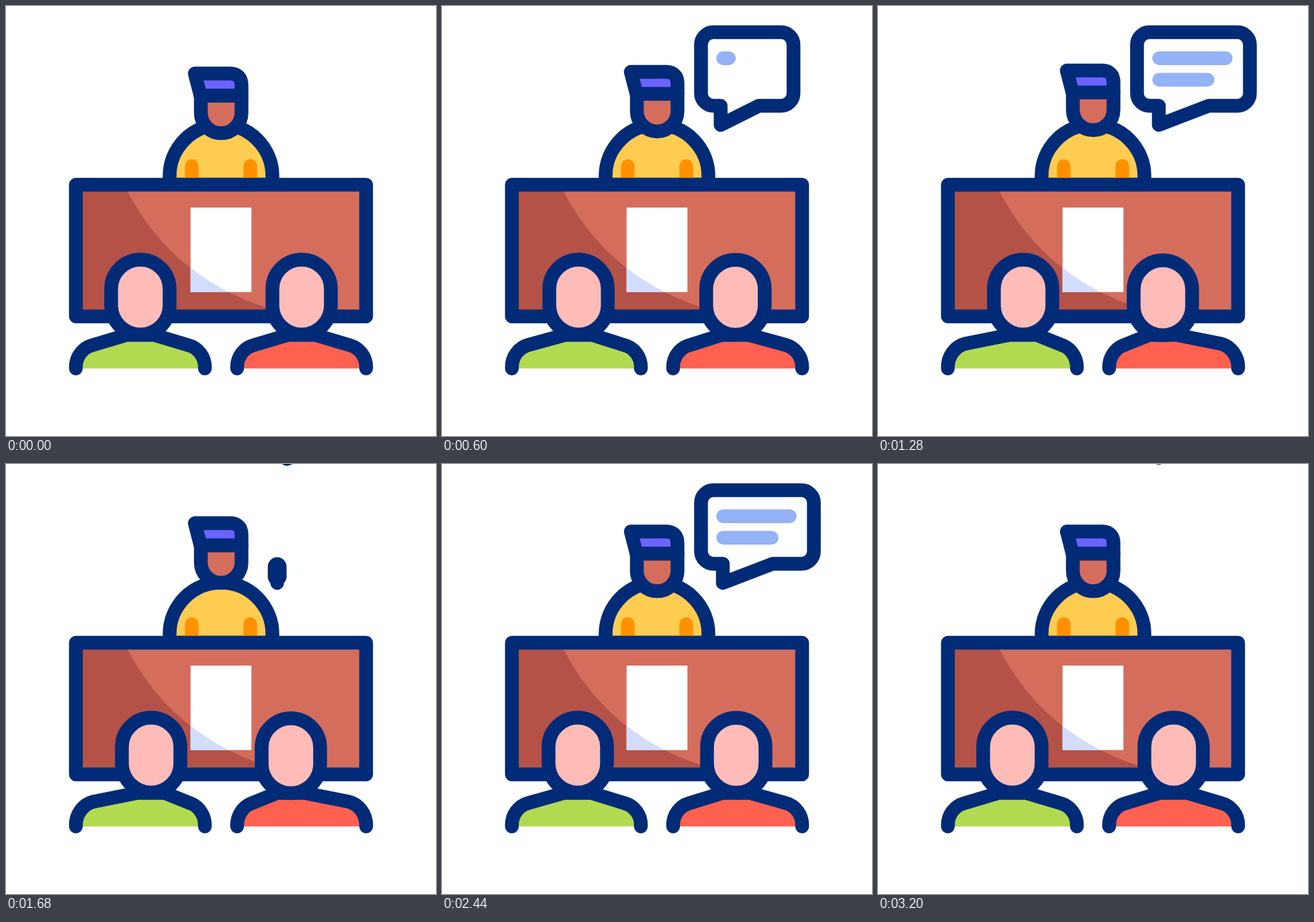
Write an HTML page with a canvas that moves like this. It is 640 by 640 pixels and loops after 3.4 s.

```html
<!DOCTYPE html>
<html lang="en">
<head>
<meta charset="utf-8">
<title>Panel talk</title>
<style>
  html, body { margin: 0; width: 100%; height: 100%; overflow: hidden; background: #fff; }
  canvas { display: block; width: 640px; height: 640px; }
</style>
</head>
<body>
<canvas id="stage"></canvas>
<script>
const LOOP = 3400, STEP = 20, LAST = 3200, CYCLE = 1512;
const NAVY = '#022b77', WOOD = '#d56d5d', SHADE = '#b45248', SKIN = '#fdbcb8';
const LINE = 20.5;

const canvas = document.getElementById('stage');
const ctx = canvas.getContext('2d');
const ratio = window.devicePixelRatio || 1;
canvas.width = canvas.height = 640 * ratio;

const lerp = (a, b, k) => a + (b - a) * k;

// Eased progress from 0 to 1
function ease(t, start, length) {
  const p = Math.min(1, Math.max(0, (t - start) / length));
  return p * p * (3 - 2 * p);
}

function shape(path, fill, stroke = NAVY) {
  const p = typeof path === 'string' ? new Path2D(path) : path;
  if (fill) { ctx.fillStyle = fill; ctx.fill(p); }
  if (stroke) { ctx.strokeStyle = stroke; ctx.stroke(p); }
}

function speaker(t) {
  shape('M243.5 266V253A76.5 76.5 0 0 1 396.5 253V266Z', '#ffcc52');
  for (const x of [266.3, 353.3]) {
    shape(`M${x} 260V238.3a10.2 10.2 0 0 1 20.4 0V260Z`, '#ff9100', null);
  }
  const lift = ease(t, 0, 270) - ease(t, 270, 463)
             + ease(t, 1064, 546) - ease(t, 1610, 546);
  ctx.save();
  ctx.translate(0, -13 * lift);
  shape('M290 133.3V159a30.2 30.2 0 0 0 60.5 0V133.3Z', WOOD);
  shape('M281 100.5H333.5Q350.5 101 350.5 118V133.3H289.5Z', '#6c63ff');
  ctx.restore();
}

function desk() {
  const edge = 'M181 276C205 322 238 362 275 390C310 417 350 438 395 451';
  const shadow = new Path2D(edge + 'V462H104V266H176Z');
  const paper = new Path2D('M274.7 300H365.3V425.7H274.7Z');
  shape('M104 266H536V462H104Z', WOOD, null);
  shape(shadow, SHADE, null);
  shape(paper, '#fff', null);
  ctx.save();
  ctx.clip(paper);
  shape(shadow, '#d2dcfd', null);
  ctx.restore();
  shape('M104 266H536V462H104Z', null);
}

function listener(k, shirt, sink) {
  const x = 200 + 16 * k;
  const lx = lerp(128, 130.5, k), ly = lerp(505, 502.5, k);
  const rx = lerp(272, 277, k), ry = lerp(505, 506, k);
  shape(`M104 539.5V537C104 522 114 ${ly + 4} ${lx} ${ly}L${x - 20} 489.5H${x + 20}` +
        `L${rx} ${ry}C286 ${ry + 4} 296 522 296 537V539.5`, shirt);
  const head = new Path2D();
  head.roundRect(x - 43.5, 377.5 + sink * k, 87, 111.5, 43.5);
  shape(head, SKIN);
}

function audience(t) {
  const k = ease(t, 385, 745) - ease(t, 1864, 743);
  listener(k, '#b1da51', 0);
  ctx.save();
  ctx.translate(640, 0);
  ctx.scale(-1, 1);
  listener(k, '#ff6150', 1);
  ctx.restore();
}

function textLine(y, length, k) {
  if (k > 0) shape(`M418.5 ${y}h${length * k}`, null, '#94b2f6');
}

function bubble(t) {
  if (t < 60 || t > 190 + CYCLE) return;
  const size = ease(t, 60, 374);
  const w = lerp(37, 168, ease(t, 426, 253));
  const left = 385.5, right = left + w, top = 39, low = 148.5, r = 18.5;
  const tip = 400 + 0.107 * w;
  const root = Math.max(tip, 378 + 0.68 * w);
  const body = new Path2D(
    `M${left + r} ${top}H${right - r}A${r} ${r} 0 0 1 ${right} ${top + r}` +
    `V${low - r}A${r} ${r} 0 0 1 ${right - r} ${low}H${root}L${tip} 177V${low}` +
    `H${left + r}A${r} ${r} 0 0 1 ${left} ${low - r}V${top + r}` +
    `A${r} ${r} 0 0 1 ${left + r} ${top}Z`);
  // Grow out of the tail tip while the outline keeps its weight
  const grown = new Path2D();
  grown.addPath(body, new DOMMatrix([size, 0, 0, size, 403.5 * (1 - size), 177 * (1 - size)]));
  ctx.save();
  ctx.translate(0, -187.5 * ease(t, 1402, 300));
  shape(grown, '#fff');
  textLine(77.8, 99, ease(t, 555, 250));
  textLine(109.8, 72, ease(t, 680, 230));
  ctx.restore();
}

function draw(t) {
  ctx.setTransform(ratio, 0, 0, ratio, 0, 0);
  ctx.fillStyle = '#fff';
  ctx.fillRect(0, 0, 640, 640);
  ctx.lineWidth = LINE;
  ctx.lineCap = ctx.lineJoin = 'round';
  speaker(t);
  desk();
  audience(t);
  bubble(t);
  bubble(t - CYCLE);
}

function tick() {
  const t = performance.now() % LOOP;
  draw(Math.min(LAST, Math.floor(t / STEP) * STEP));
  requestAnimationFrame(tick);
}
tick();
</script>
</body>
</html>
```
